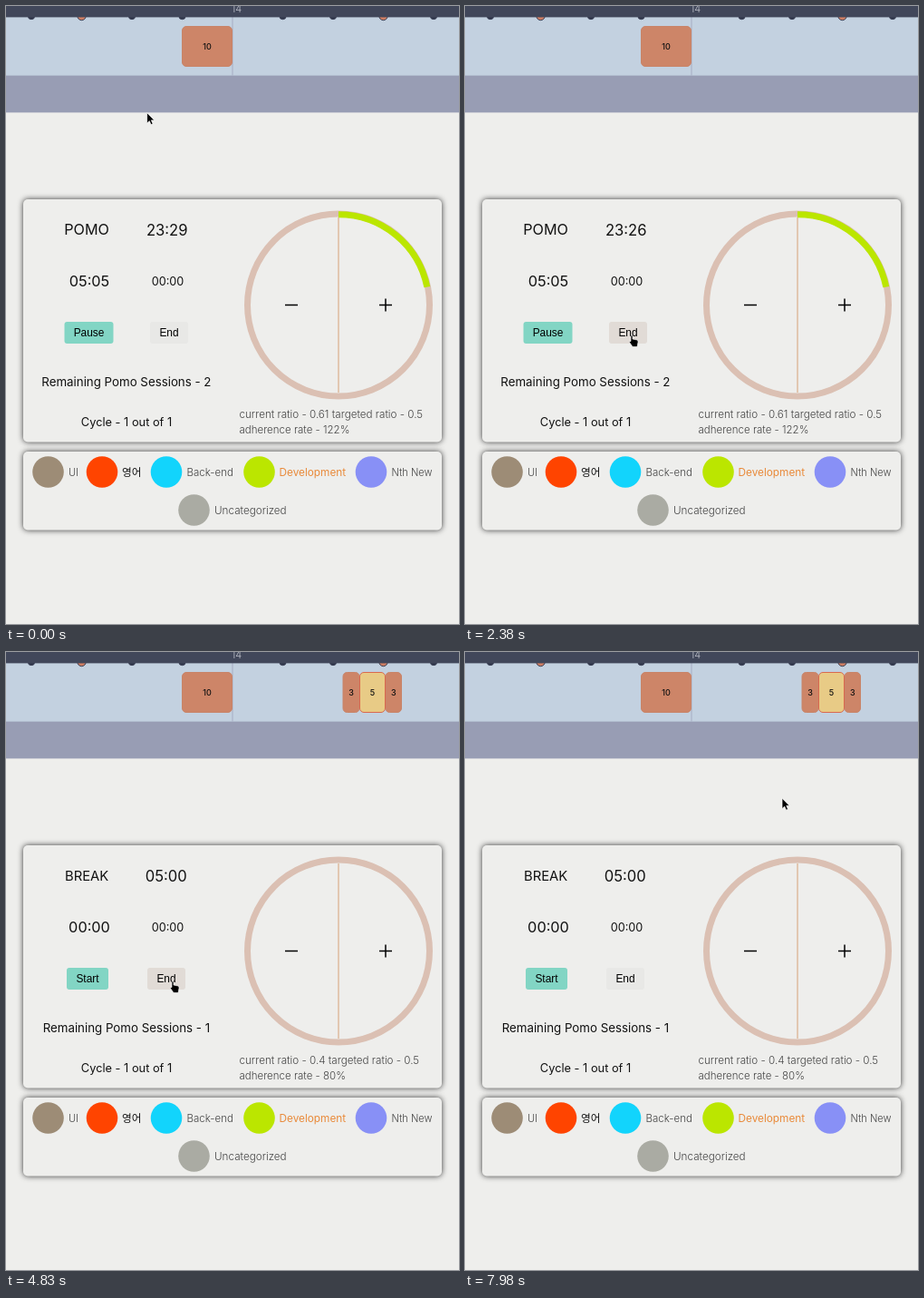
These frames come from a looping animation (500 by 681 pixels, 8000 ms). An HTML page:

```html
<!DOCTYPE html>
<html lang="en">
<head>
<meta charset="utf-8">
<style>
  html, body { margin: 0; width: 100%; height: 100%; overflow: hidden; background: #eeeeec; }
  svg { display: block; width: 100vw; height: 100vh; }
  text { font-family: Inter, "Noto Sans CJK KR", "Noto Sans CJK", sans-serif; }
  .button { font-family: "Liberation Sans", Arial, sans-serif; }
  .panel { fill: #eeeeec; filter: drop-shadow(0 0 3.2px #333); }
</style>
</head>
<body>
<svg id="stage" viewBox="0 0 500 681">
  <rect y="12" width="500" height="65" fill="#c3d1e0"/>
  <rect y="76.6" width="500" height="40.8" fill="#989db4"/>
  <path d="M250 12V76.600" stroke="#a5adc2"/>
  <g id="dots"></g>
  <rect width="500" height="12.4" fill="#41475a"/>
  <g id="blocks"></g>
  <rect class="panel" x="19" y="213" width="462" height="267.5" rx="5"/>
  <rect class="panel" x="19" y="491" width="462" height="86.5" rx="5"/>
  <g fill="none">
    <circle cx="367" cy="329.5" r="100.5" stroke="#dbc0b3" stroke-width="7"/>
    <path d="M367 233V426" stroke="#dfbda3" stroke-width="1.6"/>
    <path id="arc" stroke="#bbe600" stroke-width="7"/>
    <path d="M308 329.5h14M412 329.5h14M419 322.5v14" stroke="#000" stroke-width="1.5"/>
  </g>
  <g id="legend"></g>
  <g id="work"></g>
  <g id="rest"></g>
  <path id="arrow" d="M0 0V11.5L2.7 9L4.5 13L6.5 12.1L4.8 8.2H8.2Z" fill="#000" stroke="#fff" stroke-width=".7"/>
  <path id="hand" d="M0 1Q1-.6 2 1V4.5L7 5.5Q8.3 6 8 8L7 13H2L-1.5 8Q-1.5 6.5 0 7Z" fill="#000" stroke="#fff" stroke-width=".6"/>
</svg>
<script>
const LOOP = 8000, STEP = 70, ENDED = 3990;
const get = id => document.getElementById(id);

function add(parent, tag, attrs, content = '') {
  const el = document.createElementNS('http://www.w3.org/2000/svg', tag);
  for (const key in attrs) el.setAttribute(key, attrs[key]);
  el.textContent = content;
  return parent.appendChild(el);
}

// y is the middle of the capitals
function label(parent, content, x, y, size, attrs = {}) {
  return add(parent, 'text', {
    x, y: y + size * .364, 'font-size': size, 'text-anchor': 'middle', fill: '#111', ...attrs
  }, content);
}

const light = { 'text-anchor': 'start', 'font-weight': 300, fill: '#444' };

function button(parent, content, x, width, fill) {
  const box = add(parent, 'rect', { x, y: 348, width, height: 24, rx: 3, fill });
  label(parent, content, x + width / 2, 359.8, 11.9, { class: 'button', fill: '#000' });
  return box;
}

function block(parent, content, x, width, fill, stroke) {
  add(parent, 'rect', { x: x + .5, y: 22.5, width: width - 1, height: 44, rx: 4.5, fill, stroke });
  label(parent, content, x + width / 2, 44.3, 9, { 'font-weight': 500 });
}

// Timeline
for (let i = 0; i < 9; i++) {
  if (i === 4) continue;
  const marked = i === 1 || i === 7;
  add(get('dots'), 'circle', {
    cx: 28 + i * 55.5, cy: 11, r: marked ? 4.7 : 3.7,
    fill: marked ? '#cd7d62' : '#30374b', stroke: '#3b4055'
  });
}
label(get('blocks'), '14', 254.5, 2.5, 11, { 'font-weight': 300, fill: '#c5c8d0' });
block(get('blocks'), '10', 194, 56, '#cd8568', '#c88468');

// Categories
[
  ['UI', 46.5, 513.5, '#9d8c76', 69, 11],
  ['영어', 106, 513.5, '#ff4400', 128, 11.7, { fill: '#111', 'font-weight': 400 }],
  ['Back-end', 177, 513.5, '#12d4fc', 199.5, 11.5],
  ['Development', 279.5, 513.5, '#bbe600', 301.5, 11.8, { fill: '#e98a3a', 'font-weight': 400 }],
  ['Nth New', 403, 513.5, '#8890f6', 425.5, 11],
  ['Uncategorized', 207.5, 555.5, '#aaaba3', 230, 11.7]
].forEach(([name, cx, cy, fill, x, size, extra]) => {
  add(get('legend'), 'circle', { cx, cy, r: 17.3, fill });
  label(get('legend'), name, x, cy, size, { ...light, ...extra });
});

// Everything that differs between a running session and the break
function session(g, s) {
  label(g, s.title, 89.1, 246.5, s.titleSize);
  const clock = label(g, s.clock, s.clockX, 246.5, 16.6);
  label(g, s.elapsed, 92, 303.5, 16.3);
  label(g, '00:00', 178.5, 303.5, 12.7);
  button(g, s.action, s.actionX, s.actionWidth, '#82d5c4');
  const end = button(g, 'End', s.endX, 42, '#e8e8e6');
  label(g, `Remaining Pomo Sessions - ${s.left}`, 132.9, 414, 13.3);
  label(g, 'Cycle - 1 out of 1', 133, 458, 12.8);
  label(g, `current ratio - ${s.ratio} targeted ratio - 0.5`, 257.5, 449.5, 11.65, light);
  label(g, `adherence rate - ${s.rate}%`, 257.5, 467, 11.5, light);
  return { g, clock, end };
}
const work = session(get('work'), {
  title: 'POMO', titleSize: 16.2, clock: '23:29', clockX: 177.7, elapsed: '05:05',
  action: 'Pause', actionX: 64.5, actionWidth: 54, endX: 159, left: 2, ratio: '0.61', rate: 122
});
const rest = session(get('rest'), {
  title: 'BREAK', titleSize: 14.8, clock: '05:00', clockX: 176.8, elapsed: '00:00',
  action: 'Start', actionX: 67, actionWidth: 46, endX: 156, left: 1, ratio: '0.4', rate: 80
});
block(rest.g, '3', 371.5, 19, '#cd8568', '#c88468');
block(rest.g, '3', 418.5, 18.5, '#cd8568', '#c88468');
block(rest.g, '5', 390, 29, '#e8cb86', '#d9694f');

const angle = 78.5 * Math.PI / 180, radius = 99.8;
get('arc').setAttribute('d', `M367 ${329.5 - radius}A${radius} ${radius} 0 0 1 ` +
  `${367 + radius * Math.sin(angle)} ${329.5 - radius * Math.cos(angle)}`);

// Pointer path: time, x, y
const path = [
  [1330, 155.6, 117.7], [1680, 263.5, 315.5], [2170, 183, 362.5], [5460, 183, 362.5], [5740, 350, 161.2]
];
function pointer(t) {
  const i = path.findIndex(p => p[0] > t);
  if (i === 0) return path[0].slice(1);
  if (i < 0) return path[path.length - 1].slice(1);
  const [t0, x0, y0] = path[i - 1], [t1, x1, y1] = path[i];
  const u = (t - t0) / (t1 - t0), k = u * u * (3 - 2 * u);
  return [x0 + (x1 - x0) * k, y0 + (y1 - y0) * k];
}

const show = (el, on) => el.setAttribute('visibility', on ? 'visible' : 'hidden');
const ticks = [420, 1400, 2380, 3430];

function draw(now) {
  const t = Math.floor(now % LOOP / STEP) * STEP;
  const onBreak = t >= ENDED, current = onBreak ? rest : work;
  show(work.g, !onBreak);
  show(rest.g, onBreak);
  show(get('arc'), !onBreak);
  work.clock.textContent = '23:' + (29 - ticks.filter(k => k <= t).length);

  const [x, y] = pointer(t);
  const left = +current.end.getAttribute('x');
  const hover = x >= left && x <= left + 42 && y >= 348 && y <= 372;
  current.end.setAttribute('fill', hover ? '#e1dbd6' : '#e8e8e6');
  show(get('hand'), hover);
  show(get('arrow'), !hover);
  get(hover ? 'hand' : 'arrow').setAttribute('transform', `translate(${x} ${y})`);
}

const start = performance.now();
function frame() {
  draw(performance.now() - start);
  requestAnimationFrame(frame);
}
frame();
</script>
</body>
</html>
```
